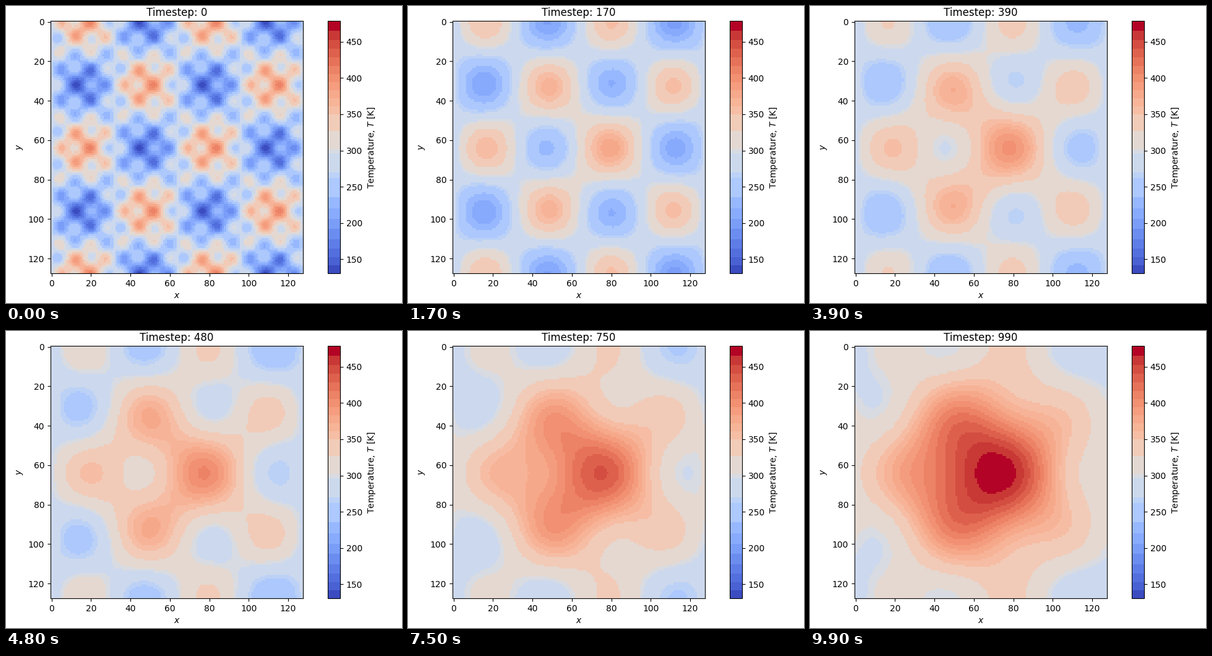
Write a matplotlib script that moves like this. It is 640x480 px and loops after 10 s.

```python
import numpy as np
import matplotlib.pyplot as plt
from matplotlib.animation import FuncAnimation
from matplotlib.colors import BoundaryNorm, ListedColormap

N = 128
FRAMES = 100
STEPS_PER_FRAME = 10
DIFFUSIVITY = 0.09
BASE = 273.15
HEATING = 0.216
SIGMA = 33
T_MIN, T_MAX = 130.8, 478.6


def wave(x, y, period):
    k = 2 * np.pi / period
    return np.sin(k * x) * np.cos(k * y)


def laplacian(t):
    return (np.roll(t, 1, 0) + np.roll(t, -1, 0)
            + np.roll(t, 1, 1) + np.roll(t, -1, 1) - 4 * t)


def simulate():
    """Periodic heat equation with a steady Gaussian source in the middle."""
    y, x = np.mgrid[0:N, 0:N].astype(float)
    r2 = (x - N / 2) ** 2 + (y - N / 2) ** 2
    source = HEATING * np.exp(-r2 / (2 * SIGMA ** 2))
    t = BASE + 100 * wave(x, y, 64) + 50 * wave(x, y, 16)
    history = [t]
    for _ in range(FRAMES - 1):
        for _ in range(STEPS_PER_FRAME):
            t = t + DIFFUSIVITY * laplacian(t) + source
        history.append(t)
    return history


def banded_colors():
    """Coolwarm in steps, with wider bands around the neutral middle."""
    edges = np.array([T_MIN, 142, 153, 165, 178, 192, 206, 220, 236, 262, 270,
                      296, 302, 327, 350, 361, 372, 383, 394, 405, 416, 428,
                      440, 452, 465, T_MAX])
    mids = (edges[:-1] + edges[1:]) / 2
    shades = plt.get_cmap("coolwarm")((mids - T_MIN) / (T_MAX - T_MIN))
    shades[0] = plt.get_cmap("coolwarm")(0.0)
    shades[-1] = plt.get_cmap("coolwarm")(1.0)
    return ListedColormap(shades), BoundaryNorm(edges, len(mids))


history = simulate()
cmap, norm = banded_colors()

fig = plt.figure(figsize=(6.4, 4.8), dpi=100)
ax = fig.add_axes([72 / 640, 0.1, 408 / 640, 0.85])
cax = fig.add_axes([520 / 640, 0.1, 20 / 640, 0.85])

image = ax.imshow(history[0], cmap=cmap, norm=norm, interpolation="nearest")
ax.set_xticks(range(0, N, 20))
ax.set_yticks(range(0, N, 20))
ax.set_xlabel("$x$")
ax.set_ylabel("$y$")
title = ax.set_title("Timestep: 0")

bar = fig.colorbar(image, cax=cax, spacing="proportional",
                   ticks=range(150, 451, 50))
bar.minorticks_off()
bar.set_label("Temperature, $T$ [K]")


def update(i):
    image.set_data(np.clip(history[i], T_MIN, T_MAX - 0.01))
    title.set_text(f"Timestep: {i * STEPS_PER_FRAME}")
    return image, title


anim = FuncAnimation(fig, update, frames=FRAMES, interval=100,
                     repeat=True, repeat_delay=0, blit=False)
plt.show()
```
